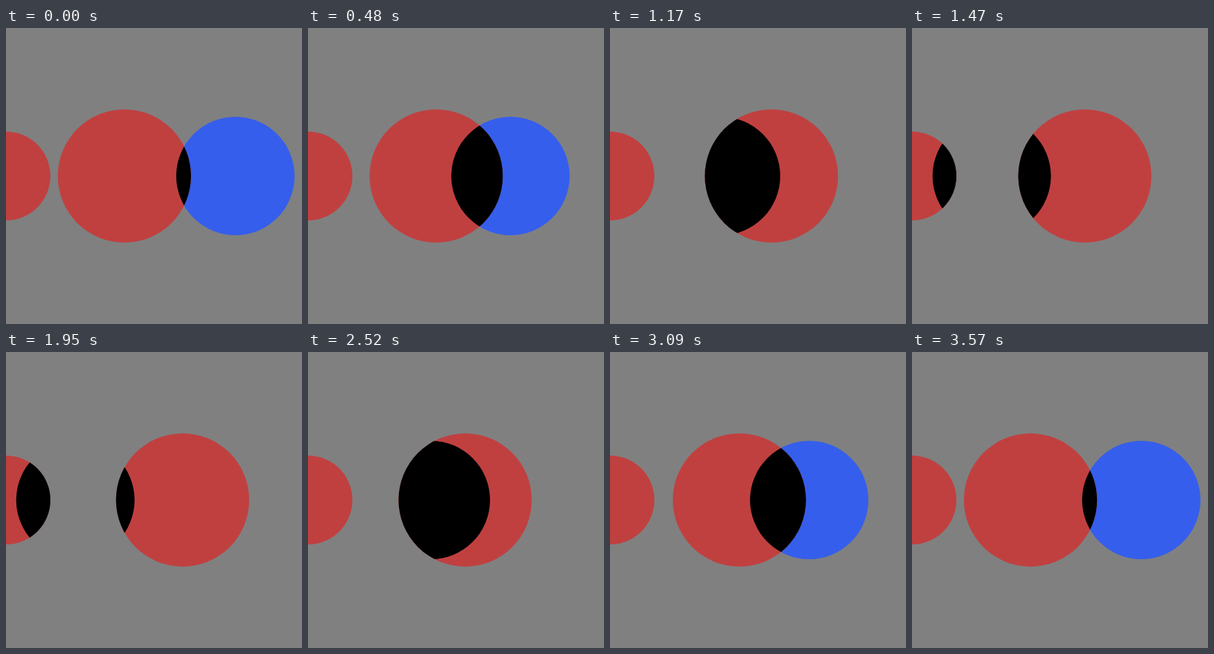
An HTML page with a canvas for the animation above (3600 ms loop, 400 px wide and 400 px high).

```html
<!DOCTYPE html>
<html lang="en">
<head>
<meta charset="utf-8">
<title>Overlapping circles</title>
<style>
  html, body { margin: 0; width: 100%; height: 100%; overflow: hidden; background: #808080; }
  canvas { display: block; width: 400px; height: 400px; }
</style>
</head>
<body>
<canvas id="stage" width="400" height="400"></canvas>
<script>
const ctx = document.getElementById('stage').getContext('2d');
const LOOP = 3600, STEP = 30, MID = 200;
const GRAY = '#808080', RED = '#c04040', BLUE = '#355eec';

function disc(x, r) {
  const path = new Path2D();
  path.arc(x, MID, r, 0, Math.PI * 2);
  return path;
}

function fill(path, color) {
  ctx.fillStyle = color;
  ctx.fill(path);
}

function draw(time) {
  const t = Math.floor((time % LOOP) / STEP) * STEP;
  const swing = Math.cos(t / LOOP * Math.PI * 2);
  const mover = disc(MID + 110 * swing, 80);
  const reds = [disc(0, 60), disc(MID - 40 * swing, 90)];

  ctx.fillStyle = GRAY;
  ctx.fillRect(0, 0, 400, 400);

  // The mover is blue only on the right; elsewhere it just darkens the red discs.
  if (swing > 0) fill(mover, BLUE);
  for (const red of reds) {
    fill(red, RED);
    ctx.save();
    ctx.clip(red);
    fill(mover, '#000');
    ctx.restore();
  }
}

const start = performance.now();
function tick() {
  draw(performance.now() - start);
  requestAnimationFrame(tick);
}
tick();
</script>
</body>
</html>
```
